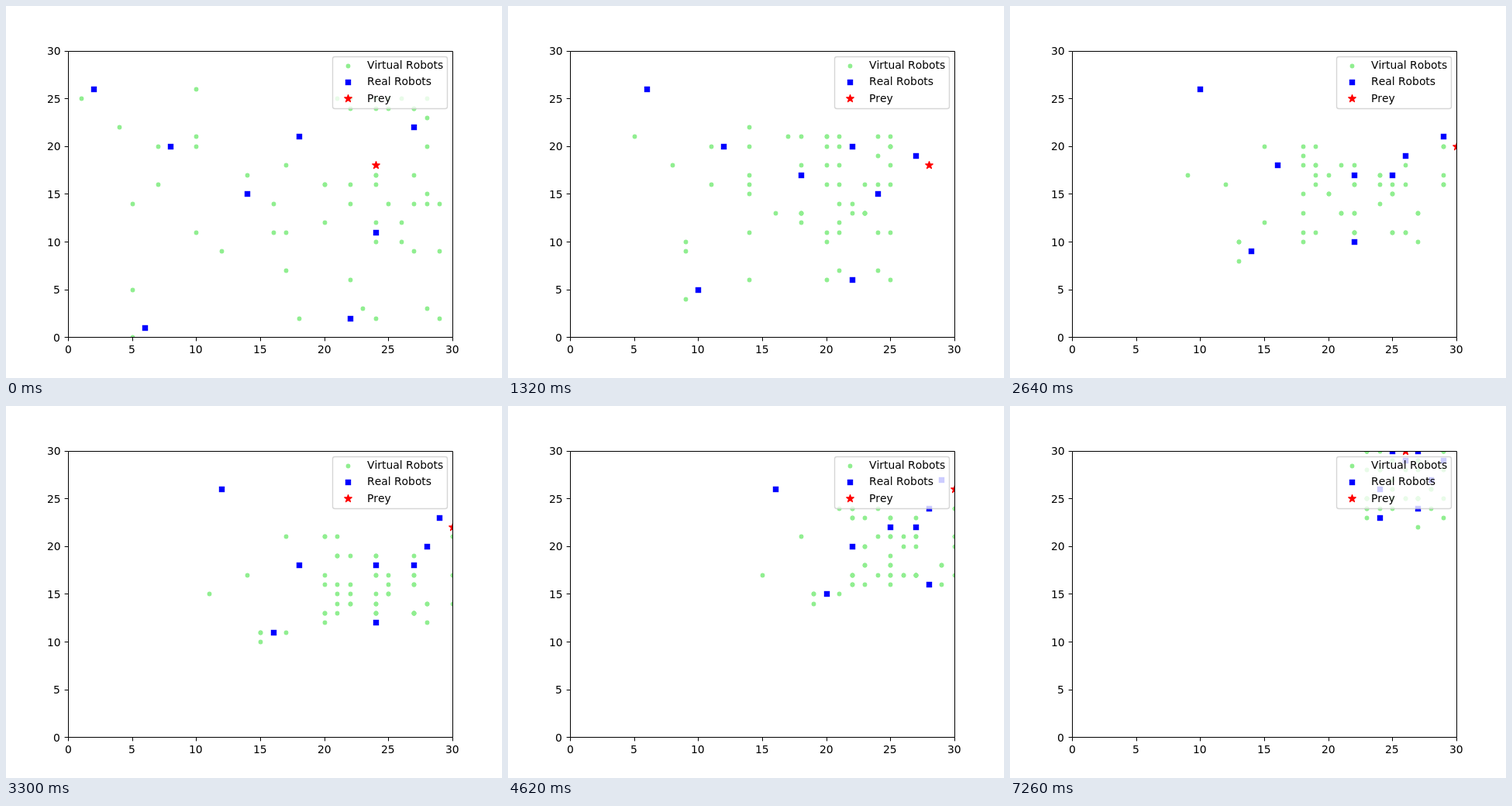
Animation, 640 px wide and 480 px high, one loop 9250 ms. Source, as an HTML page:

```html
<!DOCTYPE html>
<html lang="en">
<head>
<meta charset="utf-8">
<title>Robots chasing prey</title>
<style>
  html, body { margin: 0; width: 100%; height: 100%; overflow: hidden; background: #fff; }
  svg { display: block; width: 640px; height: 480px; }
  text { font: 13.89px "DejaVu Sans", sans-serif; font-kerning: none; fill: #000; }
  .axis { fill: none; stroke: #000; stroke-width: 1; }
</style>
</head>
<body>
<svg viewBox="0 0 640 480">
  <defs>
    <clipPath id="area"><rect x="80" y="58" width="496" height="369"/></clipPath>
    <circle id="dot" r="2.89" fill="#90ee90"/>
    <rect id="box" x="-3.69" y="-3.69" width="7.38" height="7.38" fill="#00f"/>
    <path id="star" fill="#f00" stroke="#f00" stroke-width="1.39" stroke-linejoin="round"/>
  </defs>
  <g id="field" clip-path="url(#area)"></g>
  <g id="axes"></g>
  <g id="legend">
    <rect x="421.5" y="65.5" width="148" height="67" rx="2.8" fill="#fff" stroke="#ccc"
      stroke-width="1.39" opacity=".8"/>
    <use href="#dot" x="441.5" y="77.5"/><text x="466" y="81">Virtual Robots</text>
    <use href="#box" x="441.5" y="98.5"/><text x="466" y="102">Real Robots</text>
    <use href="#star" x="441.5" y="119.5"/><text x="466" y="124">Prey</text>
  </g>
</svg>
<script>
const TICK = 330, LAST = 22, LOOP = 9250, SIZE = 30;
const $ = id => document.getElementById(id);
const px = x => 80 + x * 496 / SIZE;
const py = y => 427.2 - y * 369.6 / SIZE;
const snap = v => Math.round(v) + 0.5;
const clamp = (v, lo, hi) => Math.max(lo, Math.min(hi, v));
const mark = (id, [x, y]) => `<use href="#${id}" x="${snap(px(x))}" y="${snap(py(y))}"/>`;

// Five-pointed star
$('star').setAttribute('d', 'M' + Array.from({ length: 10 }, (_, i) => {
  const r = i % 2 ? 1.875 : 4.91, a = i * Math.PI / 5;
  return `${(r * Math.sin(a)).toFixed(3)},${(-r * Math.cos(a)).toFixed(3)}`;
}).join('L') + 'Z');

// Frame, ticks and tick labels; labels start on whole pixels
let axes = '<path class="axis" d="M80.5 58.5H576.5V427.5H80.5Z"/>';
for (let v = 0; v <= SIZE; v += 5) {
  const x = px(v), y = py(v), w = 8.84 * String(v).length;
  axes += `<path class="axis" d="M${snap(x)} 427.5v4.86M80.5 ${snap(y)}h-4.86"/>`
    + `<text x="${Math.round(x - w / 2)}" y="448">${v}</text>`
    + `<text x="${Math.round(70.3 - w)}" y="${Math.round(y + 5.5)}">${v}</text>`;
}
$('axes').innerHTML = axes;

// Prey runs right, up the wall, then back along the top
const prey = s => [
  s > 18 ? 48 - s : Math.min(24 + s, SIZE),
  clamp(12 + s, 18, SIZE)
];

// Real robots: turning points at these steps
const TURNS = [0, 4, 8, 14, 18, LAST];
const routes = [
  [[2, 26], [6, 26], [10, 26], [16, 26], [20, 25], [24, 26]],
  [[6, 1], [10, 5], [14, 9], [20, 15], [22, 19], [24, 23]],
  [[8, 20], [12, 20], [16, 18], [22, 20], [26, 24], [28, 27]],
  [[14, 15], [18, 17], [22, 17], [25, 22], [28, 26], [26, 29]],
  [[24, 11], [24, 15], [25, 17], [27, 22], [29, 26], [29, 29]],
  [[18, 21], [22, 20], [26, 19], [28, 24], [29, 28], [27, 30]],
  [[22, 2], [22, 6], [22, 10], [28, 16], [28, 20], [27, 24]],
  [[27, 22], [27, 19], [29, 21], [29, 27], [29, 30], [25, 30]]
];

// One cell per step: sideways as early, up or down as late as possible
function robot(route, s) {
  let leg = TURNS.length - 2;
  while (TURNS[leg] > s) leg--;
  const [a, b] = route.slice(leg, leg + 2);
  const done = s - TURNS[leg], left = TURNS[leg + 1] - s;
  return [a[0] + clamp(b[0] - a[0], -done, done), b[1] + clamp(a[1] - b[1], -left, left)];
}

// Seeded random numbers in [0, 1)
let seed = 7;
const rand = () => (seed = (seed * 16807) % 2147483647) / 2147483647;
const pick = (lo, hi) => lo + Math.floor(rand() * (hi - lo + 1));

// Virtual robots: scattered at first, each heading for its own place near the prey
const swarm = Array.from({ length: 58 }, () => ({
  at: [1 + Math.floor(29 * rand() ** 0.7), Math.floor(27 * rand() ** 0.7)],
  slot: [pick(-6, 0), pick(-5, 1)]
}));

function advance(s) {
  const lure = prey(Math.max(0, s - 3)), spread = 2 - s / LAST;
  for (const d of swarm) {
    d.at = d.at.map((v, i) => {
      const goal = Math.min(SIZE, Math.round(lure[i] + d.slot[i] * spread));
      return v + Math.sign(goal - v);
    });
  }
}

const scenes = [];
for (let s = 0; s <= LAST; s++) {
  if (s) advance(s);
  scenes.push(swarm.map(d => mark('dot', d.at)).join('')
    + routes.map(r => mark('box', robot(r, s))).join('')
    + mark('star', prey(s)));
}

const start = performance.now();
let shown = -1;
function draw() {
  const t = (performance.now() - start) % LOOP;
  const step = Math.min(LAST, Math.floor(t / TICK));
  if (step !== shown) $('field').innerHTML = scenes[shown = step];
  requestAnimationFrame(draw);
}
draw();
</script>
</body>
</html>
```
